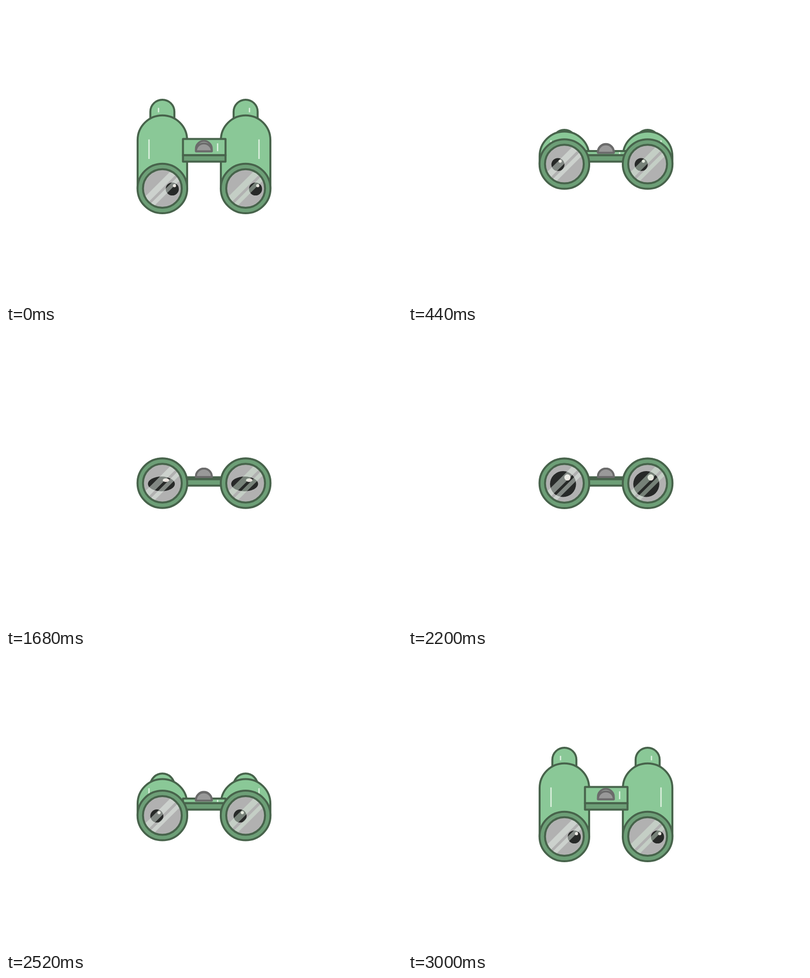
Animation, 800 px wide and 600 px high, one loop 3.04 s. Source, as an HTML page with a canvas:

```html
<!DOCTYPE html>
<html lang="en">
<head>
<meta charset="utf-8">
<title>Binoculars</title>
<style>
  html, body { margin: 0; width: 100%; height: 100%; overflow: hidden; background: #fff; }
  canvas { display: block; }
</style>
</head>
<body>
<canvas id="stage" width="800" height="600"></canvas>
<script>
const ctx = document.getElementById('stage').getContext('2d');
const LOOP = 3040, STEP = 40;
const LINE = '#47634b', LIGHT = '#8ac897', DARK = '#6d9f77', SHINE = '#dff1e1';

const clamp = v => Math.min(1, Math.max(0, v));
const mix = (a, b, k) => a + (b - a) * k;
const span = (t, from, to) => clamp((t - from) / (to - from));
const smooth = p => p * p * (3 - 2 * p);

// Gentle start, straight finish: cubic-bezier(1/3, 0, 5/6, 5/6)
function easeStart(p) {
  let lo = 0, hi = 1, y = 0;
  for (let i = 0; i < 24; i++) {
    const s = (lo + hi) / 2, r = 1 - s;
    y = 2.5 * r * s * s + s ** 3;
    if (r * r * s + y < p) lo = s; else hi = s;
  }
  return y;
}

function pose(t) {
  const opening = t >= 2160;
  const p = opening ? span(t, 2160, 3000) : 1 - span(t, 0, 760);
  const grow = opening ? 1 - smooth(span(t, 2160, 2420)) : smooth(span(t, 480, 760));
  const look = opening ? smooth(span(t, 2440, 3000)) : 1 - smooth(span(t, 0, 440));
  return {
    tilt: opening ? easeStart(p) : p ** 2.08,      // lenses and eyecups
    body: p ** (opening ? 1.97 : 2.12),            // barrels and bridge
    pupilX: mix(mix(-13, 20, look), -2, grow),
    pupilY: mix(1, 1.5, grow),
    pupilR: mix(13.2, 27.2, grow),
    blink: mix(0.1, 1, clamp(Math.abs(t - 1720) / 80))
  };
}

function paint(fill, stroke) {
  if (fill) { ctx.fillStyle = fill; ctx.fill(); }
  if (stroke) { ctx.strokeStyle = stroke; ctx.lineWidth = 4; ctx.stroke(); }
}

function circle(x, y, r, fill, stroke, ry = r) {
  ctx.beginPath();
  ctx.ellipse(x, y, r, ry, 0, 0, Math.PI * 2);
  paint(fill, stroke);
}

function arch(x, top, r, bottom, fill, stroke, ry = r) {
  ctx.beginPath();
  ctx.moveTo(x - r, bottom);
  ctx.lineTo(x - r, top + ry);
  ctx.ellipse(x, top + ry, r, ry, 0, Math.PI, Math.PI * 2);
  ctx.lineTo(x + r, bottom);
  ctx.closePath();
  paint(fill, stroke);
}

function box(x, y, w, h, fill, stroke) {
  ctx.beginPath();
  ctx.rect(x, y, w, h);
  paint(fill, stroke);
}

function glint(x, y1, y2) {
  ctx.beginPath();
  ctx.moveTo(x, y1);
  ctx.lineTo(x, y2);
  ctx.strokeStyle = SHINE;
  ctx.lineWidth = 2.6;
  ctx.stroke();
}

function barrel(x, side, s, lensY) {
  const cup = mix(263, 190, s.tilt);
  arch(x, cup, 24.3, cup + 44, LIGHT, LINE);
  glint(x - side * 7.8, cup + 16.5, cup + 25.5);
  arch(x, mix(260.8, 221.7, s.body), 50, lensY, LIGHT, LINE);
  glint(x - side * 27, mix(272.5, 270.5, s.body), mix(285, 310, s.body));
}

function bridge(k) {
  const top = mix(298.6, 269.4, k), mid = 302.5;
  box(357.5, top, 86, mid - top, LIGHT);
  glint(427.5, mix(top, mid, 0.27), mix(top, mid, 0.75));
  box(357.5, top, 86, mid - top, null, LINE);
  box(357.5, mid, 86, 13, DARK, LINE);

  const base = mix(298, 294.4, k);
  const back = mix(17, 20.8, k), front = mix(17, 16, k);
  arch(399.7, base - back, 16, base, '#b5beb7', '#6b6b6b', 16);
  arch(399.7, base - front, 16, base, '#999', '#6b6b6b', Math.min(16, front));
}

function lens(x, y, s, reflection) {
  circle(x, y, 50.2, DARK, LINE);
  ctx.save();
  circle(x, y, 39, '#b1b1b1');
  ctx.clip();

  const px = x + s.pupilX, py = y + s.pupilY, r = s.pupilR;
  circle(px, py, r, '#272928', null, r * s.blink);
  circle(px + r * 0.34, py - r * 0.51 * s.blink, r * 0.24, '#ebe3df', null, r * 0.24 * s.blink);

  ctx.translate(x, y);
  ctx.rotate(-Math.PI / 4);
  box(-50, -13, 100, 12.5, reflection);
  box(-50, 5, 100, 8.3, reflection);
  ctx.restore();
  circle(x, y, 39.2, null, LINE);
}

function draw(t) {
  const s = pose(t), lensY = mix(310.5, 369.9, s.tilt);
  ctx.fillStyle = '#fff';
  ctx.fillRect(0, 0, 800, 600);
  ctx.lineJoin = 'round';
  barrel(315.9, 1, s, lensY);
  barrel(484.1, -1, s, lensY);
  bridge(s.body);
  lens(315.9, lensY, s, 'rgba(236, 246, 238, 0.46)');
  lens(484.1, lensY, s, 'rgba(218, 242, 220, 0.44)');
}

function frame() {
  draw(Math.floor(performance.now() % LOOP / STEP) * STEP);
  requestAnimationFrame(frame);
}
frame();
</script>
</body>
</html>
```
